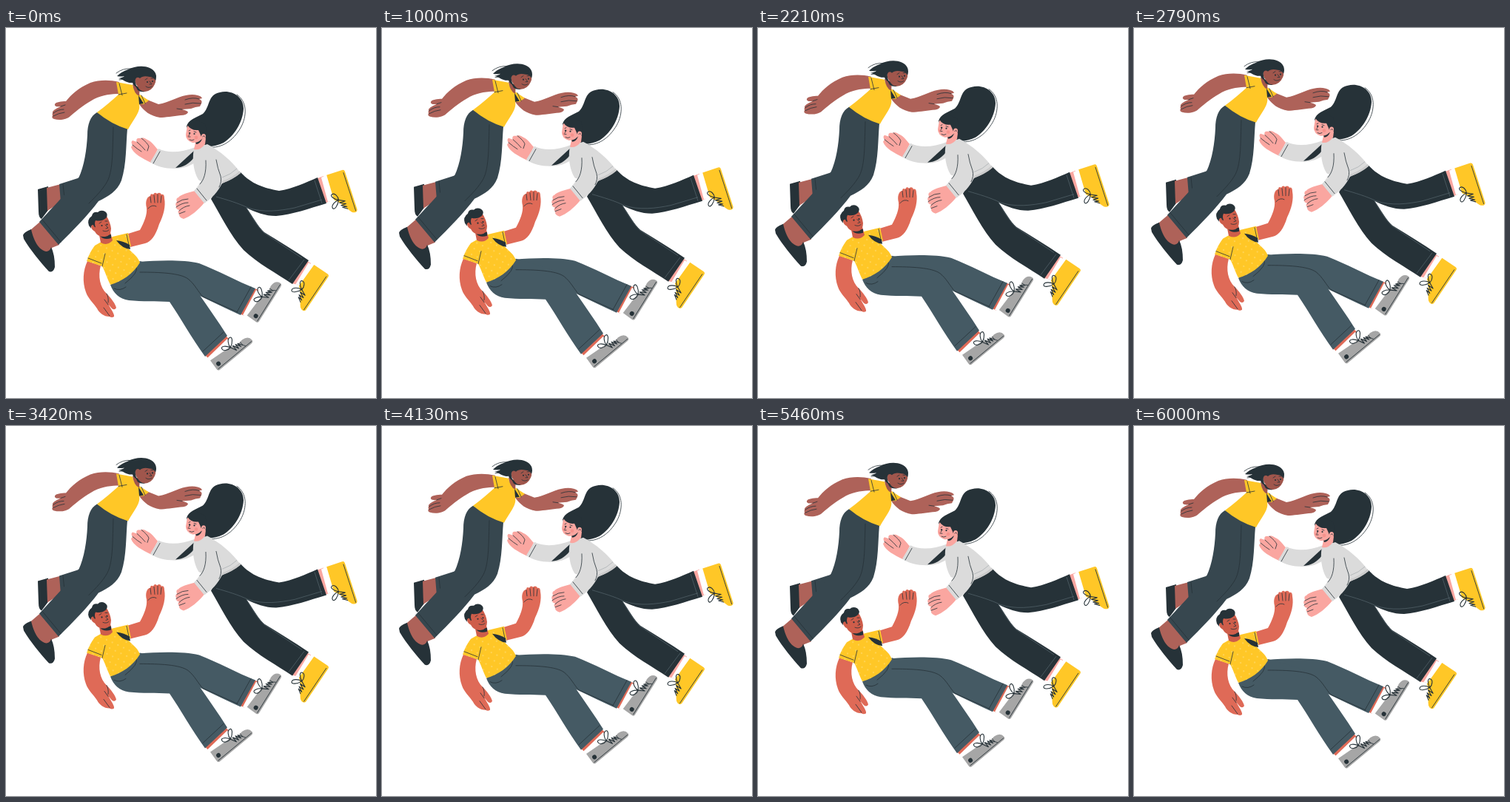
An HTML page for the animation above (6.04 s loop, 500 px wide and 500 px high).

```html
<!DOCTYPE html>
<html lang="en">
<head>
<meta charset="utf-8">
<title>Floating people</title>
<style>
  html, body { margin: 0; width: 100%; height: 100%; overflow: hidden; background: #fff; }
  svg { display: block; width: 100vw; height: 100vh; }
  .ink { fill: #263238; }
  .yellow { fill: #ffc727; }
  .slate { fill: #37474f; }
  .denim { fill: #455a64; }
  .grey { fill: #dbdbdb; }
  .brown { fill: #ae6259; }
  .umber { fill: #a0564c; }
  .pink { fill: #faa6a0; }
  .red { fill: #df6a57; }
  .rust { fill: #ce5d4a; }
  .white { fill: #fff; }
  .line { fill: none; stroke: #263238; stroke-width: .8; stroke-linecap: round; stroke-linejoin: round; }
  .seam { fill: none; stroke: #56666e; stroke-width: .7; }
</style>
</head>
<body>
<svg viewBox="0 0 500 500">
  <defs>
    <pattern id="dots" width="12" height="12" patternUnits="userSpaceOnUse" patternTransform="rotate(-20)">
      <g fill="#ffe9a3"><circle cx="2" cy="2" r=".7"/><circle cx="8" cy="8" r=".7"/></g>
    </pattern>
    <!-- shoes: heel of the sole at 0,0 and toe along +x -->
    <g id="laces" class="line" style="stroke-width:1.1">
      <path d="M32-14C32-19 36-26 40-25S39-17 32-14C27-13 21-16 22-20S29-20 32-14"/>
      <path d="M32-14L36-6L36-14L40-6L40-13L44-6L43-12L47-6"/>
    </g>
    <g id="sneaker">
      <path fill="#a6a6a6" d="M2 0Q-1 0-1-3L0-18L33-15C38-10 44-11 51-12Q61-11 61-3Q61 0 57 0Z"/>
      <path class="line" d="M1-2.2H59M47-11Q46-6 49-3"/>
      <circle class="ink" cx="5.7" cy="-7.5" r="3"/>
      <use href="#laces"/>
    </g>
    <g id="trainer">
      <path class="yellow" d="M3 0Q0 0 0-3L0-25L35-26C40-19 51-14 58-8Q62-2 57 0Z"/>
      <path class="line" d="M4-2.4H58"/>
      <use href="#laces" x="5" y="-6"/>
    </g>
    <path id="shirt" d="M127 290L144 282L165 277L169 295L160 292C167 302 177 306 181 317C171 333 157 342 141 347C136 337 134 329 130 322L109 315Q113 303 120 294Z"/>
  </defs>

  <g id="crew">
    <!-- woman in yellow -->
    <g>
      <path class="ink" d="M43 218L57 214L57 246L48 258Q44 256 44 248Z"/>
      <path class="brown" d="M55 216L74 211L76 234L56 247Z"/>
      <path class="slate" d="M72 211L97 203L116 190L92 226L74 236Z"/>
      <path class="line" d="M77 211L79 230"/>

      <path class="brown" d="M33 273L47 261L72 293L62 297L58 312L40 302Z"/>
      <path class="ink" d="M23 280Q24 276 34 272C37 286 44 301 55 302Q60 301 61 296Q66 306 66 323Q64 331 58 329C46 316 33 300 24 285Z"/>

      <path class="slate" d="M123 114L164 136C162 158 163 184 156 206C150 221 139 227 125 234C110 254 91 273 71 293L45 262C65 240 84 221 98 203C106 186 109 164 110 145C110 130 114 119 123 114Z"/>
      <path class="line" d="M145 134C144 160 145 192 137 207C131 218 122 227 112 237"/>
      <path class="line" d="M49 259L74 289"/>

      <path class="brown" d="M153 73C140 70 126 70 114 74C98 81 88 90 81 99C75 99 67 100 66 103S70 107 74 106C67 109 62 112 63 115Q62 117 63 118Q61 122 65 123C72 125 82 124 87 119C96 111 108 102 119 96C131 90 143 89 153 89Z"/>
      <path class="line" d="M64 115Q70 110 78 110M64 119Q71 115 79 114M74 106L80 104"/>

      <path class="brown" d="M191 97L206 103C220 101 231 93 243 91Q252 89 259 91Q264 92 265 95L261 96Q266 98 264 102L262 106L256 107L250 109L238 110Q246 112 246 114Q244 118 236 118C226 119 215 121 208 121C195 119 186 112 180 103Z"/>
      <path class="line" d="M242 97Q253 93 261 96M242 103Q252 100 263 102M238 110L231 109"/>

      <path class="yellow" d="M149 73L171 77Q173 87 181 90L193 98L186 103L180 103C182 113 174 121 165 137Q142 130 123 114C134 106 143 98 152 90Z"/>
      <path class="line" d="M153 75L157 91M152 90L163 88M183 91L188 102"/>
      <path class="ink" d="M179 91L186 102L180 103Z"/>
      <path class="umber" d="M171 76L181 80L180 92Q173 89 171 76Z"/>
      <path class="ink" d="M174 77L188 86Q182 87 178 84Z"/>
      <path class="umber" d="M176 62L200 62Q204 70 201 76Q197 85 188 86Q180 85 178 79Q172 74 176 62Z"/>
      <path class="ink" d="M150 65Q156 59 165 56C176 50 196 49 202 61Q204 66 202 71Q199 66 194 66Q185 64 181 68Q177 65 175 69Q174 74 177 80Q172 78 171 74C163 75 158 69 152 68Q158 67 160 65Q154 66 150 65Z"/>
      <path class="line" d="M149 61Q158 54 169 55M153 70L162 69M188 70L191 68M196 68L199 68M194 72L197 76L194 76M189 79Q193 82 197 79"/>
      <g class="ink"><circle cx="191" cy="73" r="1.1"/><circle cx="198" cy="72" r="1.1"/></g>
    </g>

    <!-- woman in grey -->
    <g>
      <path class="ink" d="M244 133C246 124 257 121 266 116C276 107 272 90 289 87C304 83 321 92 321 109C320 128 308 146 294 155Q282 161 270 160L264 152Z"/>
      <path class="line" d="M312 90C326 99 326 119 317 135C307 152 292 163 274 161"/>

      <path class="pink" d="M205 164C201 160 198 154 191 151Q185 147 183 149L178 149Q175 151 177 154L171 152Q168 154 171 158L169 161C172 170 184 176 196 182Z"/>
      <path class="line" d="M177 154Q184 160 188 165M171 158Q178 164 183 167M183 149Q191 155 193 160L191 166"/>
      <path class="grey" d="M206 163C220 170 237 168 256 161L260 178C250 187 239 190 228 190C214 190 203 187 195 181Z"/>
      <path class="line" d="M208 167L199 183"/>
      <path class="ink" d="M229 189L254 166L254 175C247 184 240 188 229 189Z"/>

      <path class="pink" d="M421 203L429 200L438 234L430 237Z"/>
      <path class="white" d="M426 202L435 198L443 232L435 235Z"/>
      <path class="pink" d="M386 345L406 314L412 318L394 347Z"/>
      <path class="white" d="M391 347L409 317L413 320L400 346Z"/>
      <use href="#trainer" transform="translate(457 191) rotate(72) scale(1 -1)"/>
      <use href="#trainer" transform="translate(437 334) rotate(124) scale(1 -1)"/>

      <path class="ink" d="M317 195C332 211 348 216 369 220C388 217 405 209 421 202L433 237C409 244 388 252 365 254C350 254 337 249 325 243C333 254 341 269 349 276C369 288 390 301 409 314L387 346C365 331 341 319 321 300C303 280 290 253 277 231L292 206Z"/>
      <path class="seam" d="M417 206L427 237M403 313L382 341M284 228C298 232 315 237 327 243C348 250 370 247 390 243L427 232M325 243C332 255 341 270 349 277L400 311"/>

      <path class="grey" d="M254 163L272 157C289 166 306 180 317 196C307 204 297 208 286 213L261 206C257 201 250 184 254 163Z"/>
      <path fill="#cbcbcb" d="M292 207Q306 202 316 193L317 196Q307 205 291 210Z"/>
      <path class="seam" stroke-opacity=".4" d="M292 202Q304 198 312 190"/>
      <path class="pink" d="M256 220C247 222 236 225 233 229Q229 230 231 235Q228 237 230 241Q229 245 234 246Q231 249 234 251Q233 256 240 258C249 255 260 246 268 236Z"/>
      <path class="line" d="M231 236Q238 231 246 231M230 242Q238 236 246 236M234 247Q240 241 248 240M234 251L242 248"/>
      <path class="grey" d="M269 181C269 198 264 210 254 220L268 237C278 230 286 222 292 210Q292 194 286 177Z"/>
      <path class="line" d="M270 179C271 196 267 206 262 211M284 178Q286 190 290 200Q292 208 288 215M258 217L271 233"/>

      <path class="pink" d="M257 150L270 149L269 157Q262 166 254 164Z"/>
      <path class="ink" d="M256 154L265 150Q262 157 257 157Z"/>
      <path class="pink" d="M245 132L263 134L267 146Q262 156 252 155Q243 152 243 144Z"/>
      <path class="ink" d="M244 136Q246 126 256 123L269 130Q272 139 269 145L264 147Q262 142 260 138Q250 139 245 131Z"/>
      <ellipse class="pink" cx="267" cy="146.5" rx="3" ry="3.6"/>
      <path class="line" d="M247 139L249 138M254 140L257 141M249 142L246 147L249 147M248 151Q251 153 254 151M266 147Q268 144 268.5 147"/>
      <g class="ink"><circle cx="248" cy="142" r="1.1"/><circle cx="254.5" cy="143" r="1.1"/></g>
      <g fill="#f2827c" opacity=".5"><circle cx="257" cy="148" r="2.4"/><circle cx="245.5" cy="146" r="1.6"/></g>
    </g>

    <!-- man -->
    <g>
      <path class="red" d="M316 386L336 352L341 354L322 389Z"/>
      <path class="white" d="M320 388L338 354L346 359L328 392Z"/>
      <path class="red" d="M269 442L297 416L301 420L273 446Z"/>
      <path class="white" d="M272 446L299 420L305 431L278 449Z"/>
      <use href="#sneaker" transform="translate(341 398) rotate(-58)"/>
      <use href="#sneaker" transform="translate(287.5 463) rotate(-39.6)"/>

      <path class="denim" d="M180 316C205 314 240 313 261 318C287 328 312 342 337 352L317 388C298 379 280 371 262 362L220 340Z"/>
      <path class="line" d="M331 350L312 384"/>
      <path class="denim" d="M181 315L216 325C238 331 251 341 259 357C273 377 287 397 299 416L269 444C251 419 236 392 221 370C203 369 184 370 166 368C153 366 145 358 141 347Z"/>
      <path class="line" d="M181 330C207 330 235 331 246 339C255 346 260 357 266 363L313 384M176 323Q180 330 161 345M294 411L266 437M146 352Q154 356 162 350"/>

      <path class="red" d="M110 315L128 321C124 336 127 350 136 359C142 365 148 373 149 378Q147 382 143 379L138 373C142 380 147 387 146 390Q143 392 140 390C132 390 126 385 123 379C118 371 111 366 108 357C103 343 104 328 110 315Z"/>
      <path class="line" d="M138 374L133 367M140 389L132 378M136 359Q139 364 138 371"/>
      <path class="red" d="M165 278L181 273C187 262 191 252 190 243C188 235 190 228 195 227Q195 223 199 225Q201 221 204 224Q208 221 210 225Q214 224 214 230C216 241 213 253 207 265C202 281 196 289 188 291L168 296Z"/>
      <path class="line" d="M195 228L196 236M200 226L201 236M205 225L205 236M210 227L209 236M192 244Q197 238 203 241"/>

      <use href="#shirt" class="yellow"/>
      <use href="#shirt" fill="url(#dots)"/>
      <path class="ink" d="M149 287Q159 288 167 293L168 299Q157 298 149 287Z"/>
      <path class="line" d="M111 311L129 318M130 322L134 305M163 279L166 293"/>

      <path class="rust" d="M126 280L141 276L144 287Q137 295 128 290Z"/>
      <path class="ink" d="M127 281L142 279L142 284Q132 287 127 281Z"/>
      <path class="rust" d="M115 265L118 256L135 253Q141 262 142 271Q142 281 134 282Q124 283 120 275Q114 272 115 265Z"/>
      <path class="ink" d="M112 267Q109 259 116 254Q117 248 124 249Q128 245 134 248Q139 252 135 257Q129 262 121 260Q119 264 121 269Q119 270 118 266Q114 266 115 271Z"/>
      <path class="line" d="M126 264L129 262M134 261L137 261M134 266L138 270L135 271M131 274Q136 276 139 273"/>
      <g class="ink"><circle cx="129.5" cy="267" r="1.1"/><circle cx="136.5" cy="265.5" r="1.1"/></g>
    </g>
  </g>
</svg>
<script>
  const LOOP = 6040, CYCLE = 6000, LIFT = 10;
  const crew = document.getElementById('crew');

  // Steady drift up and back down, then a short rest before the loop repeats.
  function draw(now) {
    const t = Math.min(now % LOOP, CYCLE) / CYCLE;
    const y = -LIFT * (1 - Math.abs(2 * t - 1));
    crew.setAttribute('transform', `translate(0 ${y.toFixed(3)})`);
    requestAnimationFrame(draw);
  }
  requestAnimationFrame(draw);
</script>
</body>
</html>
```
